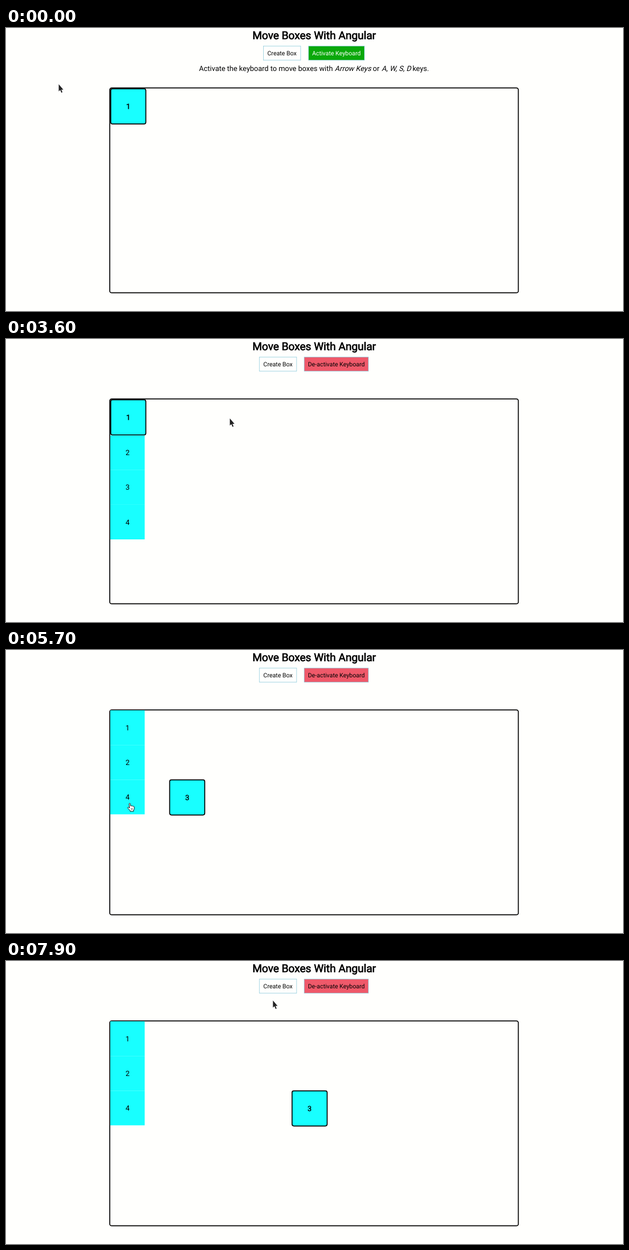
Recreate the animation shown at these times as an HTML page. Size 1106x507 px, loop 8 s.

```html
<!DOCTYPE html>
<html lang="en">
<head>
<meta charset="utf-8">
<title>Move Boxes With Angular</title>
<style>
html, body { margin: 0; width: 100%; height: 100%; overflow: hidden; background: #fffffd; }
body { position: relative; font: 13px/16px Roboto, sans-serif; color: #000; text-rendering: geometricPrecision; }
svg { position: absolute; left: 0; top: 0; }
text { text-anchor: middle; }
p { position: absolute; left: 0; top: 66px; width: 1104.2px; margin: 0; text-align: center; white-space: nowrap; }
em { display: inline-block; font-style: normal; transform: skewX(-14deg); transform-origin: 0 75%; }
</style>
</head>
<body>
<p id="hint">Activate the keyboard to move boxes with <em>Arrow Keys</em> or <em>A, W, S, D</em> keys.</p>
<svg id="stage" width="1106" height="507"></svg>
<script>
const LOOP = 8000, FRAME = 100, STEP = 8.125, SMALL = 62.1, BIG = 64.6, LEFT = 186.9, TOP = 108.1;
const stage = document.getElementById('stage');
const hint = document.getElementById('hint');

// Pointer strokes: first and last moment of change, then the place reached
const strokes = [
  [0, 0, 94, 100], [800, 900, 231, 219], [1100, 1300, 549, 86], [1500, 1500, 556, 59],
  [1600, 1700, 575, 42], [2300, 2500, 468.5, 43], [3600, 3700, 333, 240],
  [3900, 4000, 255, 291], [4100, 4300, 217.5, 274], [7500, 7900, 478, 70]
];

const ease = u => u * u * (3 - 2 * u);
const rect = (x, y, w, h, attrs) => `<rect x="${x}" y="${y}" width="${w}" height="${h}" ${attrs}/>`;
const label = (x, y, size, str, attrs = '') => `<text x="${x}" y="${y}" font-size="${size}" ${attrs}>${str}</text>`;
const heavy = w => `stroke="#000" stroke-width="${w}"`;

function button(x, w, str, fill, color) {
  return rect(x + .4, 32.3, w - .8, 25.4, `fill="${fill}" stroke="#8ccbdc" stroke-width=".8"`) +
    label(x + w / 2, 49, 10.84, str, `fill="${color}"`);
}

function box(n, x, y, active) {
  const size = active ? BIG : SMALL, mid = size / 2;
  const shape = active
    ? rect(x + .85, y + .85, size - 1.7, size - 1.7, `rx="3.2" fill="#18ffff" ${heavy(1.7)}`)
    : rect(x, y, size - .4, size, 'fill="#18ffff"');
  return shape + label(x + mid, y + mid + 4.6, 13, n, active ? heavy(.4) : '');
}

const boxCount = t => t < 2900 ? 1 : Math.min(4, 2 + Math.floor((t - 2900) / 200));

// One key press, then the key repeats while held
function stepsRight(t) {
  if (t < 5400) return t < 4800 ? 0 : 1;
  return Math.min(40, Math.round(3 + (t - 5400) / 700 * 23));
}

function boxes(t) {
  const active = t < 4300 ? 1 : 3, steps = stepsRight(t);
  let out = '', y = TOP;
  for (let n = 1; n <= boxCount(t); n++) {
    if (n === 3 && steps) continue;
    out += box(n, LEFT, y, n === active);
    y += n === active ? BIG : SMALL;
  }
  return steps ? out + box(3, LEFT + steps * STEP, 231.8, true) : out;
}

function pointer(t) {
  const i = strokes.findLastIndex(s => s[0] <= t);
  const [from, to, x, y] = strokes[i];
  const [, , x0, y0] = strokes[Math.max(0, i - 1)];
  const u = ease(Math.min(1, (t - from + FRAME) / (to - from + FRAME)));
  return [x0 + (x - x0) * u, y0 + (y - y0) * u];
}

function cursor(t) {
  const [x, y] = pointer(t);
  const overBox = x < LEFT + SMALL && y > TOP && y < TOP + boxCount(t) * SMALL && x > LEFT;
  const path = overBox || y < 60
    ? `<path d="M3.1 1.6C3.1 .2 5.2 .2 5.3 1.6L5.8 5.3C6.5 4.7 7.5 4.9 7.8 5.6C8.6 5 9.5 5.3 9.8 6.1C11 5.6 12.3 6.2 12.4 7.4L12.3 10.5L11.2 13V15H4.9V13.4L.9 9.3C.1 8.2 1.3 7.2 2.4 7.9L4 9Z" fill="#fff" stroke="#111" stroke-linejoin="round"/>
       <path d="M7.1 9.3V12.4M9 9.3V12.4" stroke="#111" stroke-width=".7"/>`
    : '<path d="M.5 .8V13.4L3.2 11L5.3 15.9L7.2 15.1L5.1 10.4H8.8Z" fill="#222" stroke="#fff" stroke-width="1.6" paint-order="stroke"/>';
  return `<g transform="translate(${x} ${y})">${path}</g>`;
}

function draw(t) {
  const on = t >= 1900;
  hint.hidden = on;
  stage.innerHTML = label(552.4, 20, 19.5, 'Move Boxes With Angular', heavy(.7)) +
    button(on ? 453.8 : 461, 67.5, 'Create Box', '#fffffd', '#000') +
    (on ? button(534.3, 115.8, 'De-activate Keyboard', '#ef596a', '#000')
        : button(541.8, 101, 'Activate Keyboard', '#0aa80a', '#fff')) +
    rect(186, 107.3, 732.4, 367.1, `rx="3.5" fill="none" ${heavy(1.7)}`) +
    boxes(t) + cursor(t);
}

let shown = -1;
function tick() {
  const t = Math.floor(performance.now() % LOOP / FRAME) * FRAME;
  if (t !== shown) draw(shown = t);
  requestAnimationFrame(tick);
}
tick();
</script>
</body>
</html>
```
